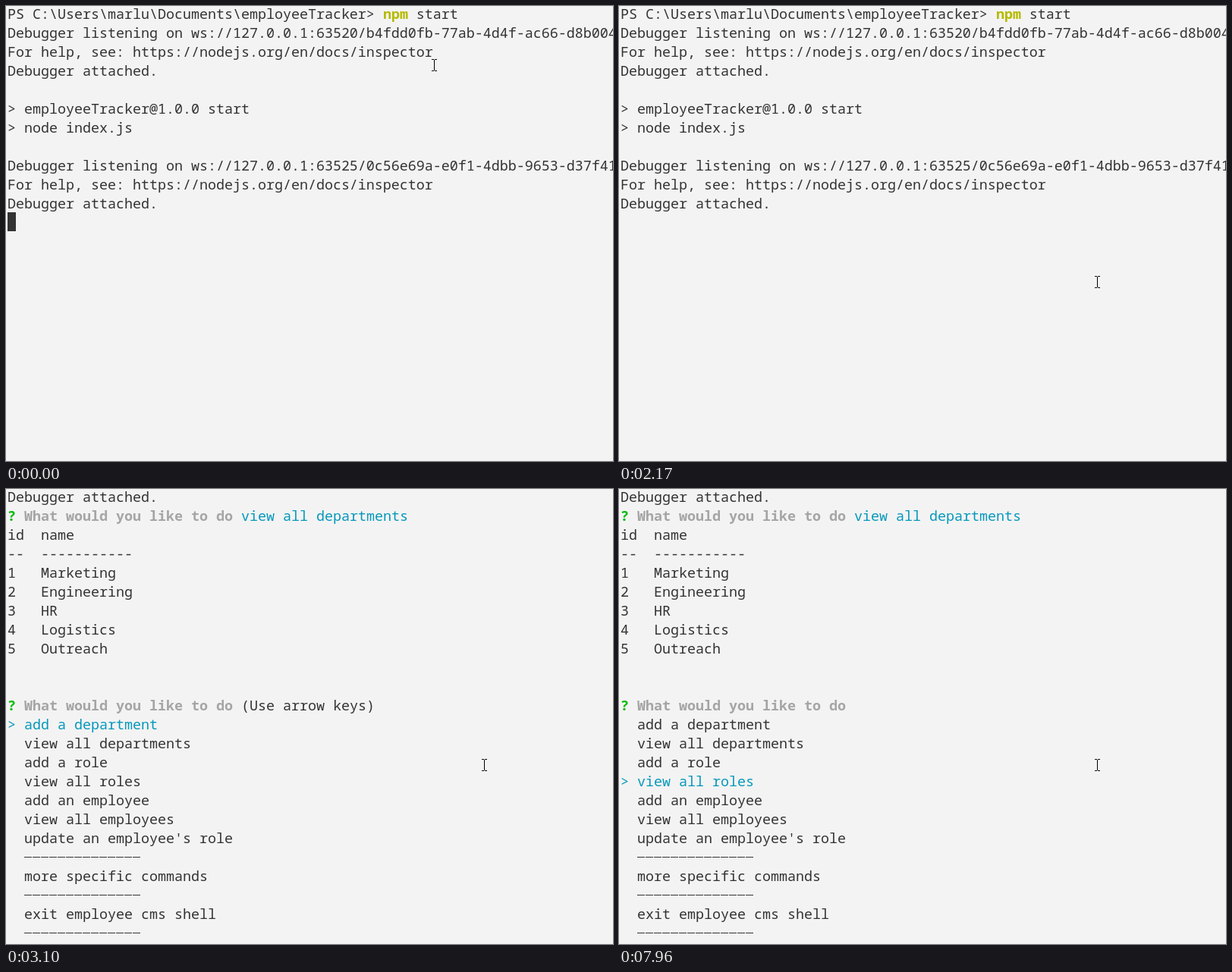
Write an HTML page with a canvas that moves like this. It is 800 by 600 pixels and loops after 8000 ms.

```html
<!DOCTYPE html>
<html lang="en">
<head>
<meta charset="utf-8">
<title>Terminal session</title>
<style>
html, body { margin: 0; height: 100%; overflow: hidden; background: #f3f3f3; }
canvas { display: block; }
</style>
</head>
<body>
<canvas id="stage" width="800" height="600"></canvas>
<script>
const ctx = document.getElementById('stage').getContext('2d');
const LOOP = 8000, CELL = 11, LINE = 25, LEFT = 2, BASE = 17;
const INK = '#333333', BLUE = '#0598bc', GREEN = '#00bc00', GRAY = '#a5a5a5', YELLOW = '#b5ba00';

const QUESTION = 'What would you like to do';
const RULE = '─'.repeat(14);
const HELP = 'For help, see: https://nodejs.org/en/docs/inspector';
const LAUNCH = [
  'PS C:\\Users\\marlu\\Documents\\employeeTracker>     start',
  'Debugger listening on ws://127.0.0.1:63520/b4fdd0fb-77ab-4d4f-ac66-d8b004',
  HELP,
  'Debugger attached.',
  '',
  '> employeeTracker@1.0.0 start',
  '> node index.js',
  '',
  'Debugger listening on ws://127.0.0.1:63525/0c56e69a-e0f1-4dbb-9653-d37f41',
  HELP,
  'Debugger attached.'
];
const TABLE = [
  'Debugger attached.', '',
  'id  name', '--  -----------',
  '1   Marketing', '2   Engineering', '3   HR', '4   Logistics', '5   Outreach'
];
const OPTIONS = [
  'add a department', 'view all departments', 'add a role', 'view all roles',
  'add an employee', 'view all employees', "update an employee's role",
  RULE, 'more specific commands', RULE, 'exit employee cms shell', RULE
];

// Selected option from each time on; -1 means no menu
const SELECTION = [[0, -1], [370, 0], [2170, -1], [2230, 1], [3100, 0], [6660, 1], [7150, 2], [7960, 3]];
// Mouse pointer: time, x, y
const POINTER = [[0, 564, 78], [680, 558, 146], [740, 557, 236], [800, 615, 340], [860, 630, 364]];

const at = (steps, t) => steps.filter(step => step[0] <= t).pop();

function write(col, row, text, color = INK, weight = 500) {
  ctx.font = `${weight} 18.33px "Noto Sans Mono", monospace`;
  ctx.fillStyle = color;
  ctx.fillText(text, LEFT + col * CELL, BASE + row * LINE);
}

function ask(row) {
  write(0, row, '?', GREEN, 700);
  write(2, row, QUESTION, GRAY, 700);
}

function drawMenu(selected) {
  ask(11);
  if (selected === 0) write(28, 11, '(Use arrow keys)');
  OPTIONS.forEach((option, i) => {
    const row = 12 + i;
    if (option === RULE) {
      ctx.fillStyle = INK;
      for (let c = 2; c < 16; c++) ctx.fillRect(LEFT + c * CELL, row * LINE + 10, CELL - 1, 1);
      return;
    }
    const active = i === selected;
    if (active) write(0, row, '>', BLUE);
    write(2, row, option, active ? BLUE : INK);
  });
}

function drawPointer(x, y) {
  ctx.fillStyle = '#000';
  ctx.fillRect(x, y - 7, 1, 14);
  for (const edge of [y - 8, y + 7]) {
    ctx.fillRect(x - 3, edge, 3, 1);
    ctx.fillRect(x + 1, edge, 3, 1);
  }
}

function draw(t) {
  ctx.fillStyle = '#f3f3f3';
  ctx.fillRect(0, 0, 800, 600);
  const launching = t < 3100;
  (launching ? LAUNCH : TABLE).forEach((line, row) => write(0, row, line));
  if (launching) {
    write(45, 0, 'npm', YELLOW, 700);
  } else {
    ask(1);
    write(28, 1, 'view all departments', BLUE);
  }

  const selected = at(SELECTION, t)[1];
  if (selected >= 0) drawMenu(selected);
  if (t < 370) {
    ctx.fillStyle = INK;
    ctx.fillRect(LEFT, 272, CELL, LINE);
  }

  const [, x, y] = at(POINTER, t);
  // The link underlines while hovered
  if (x < 562 && y > 224 && y < 249) {
    ctx.fillStyle = INK;
    ctx.fillRect(LEFT + 15 * CELL, 246, 36 * CELL, 1);
  }
  drawPointer(x, y);
}

function tick() {
  draw(performance.now() % LOOP);
  requestAnimationFrame(tick);
}
tick();
</script>
</body>
</html>
```
